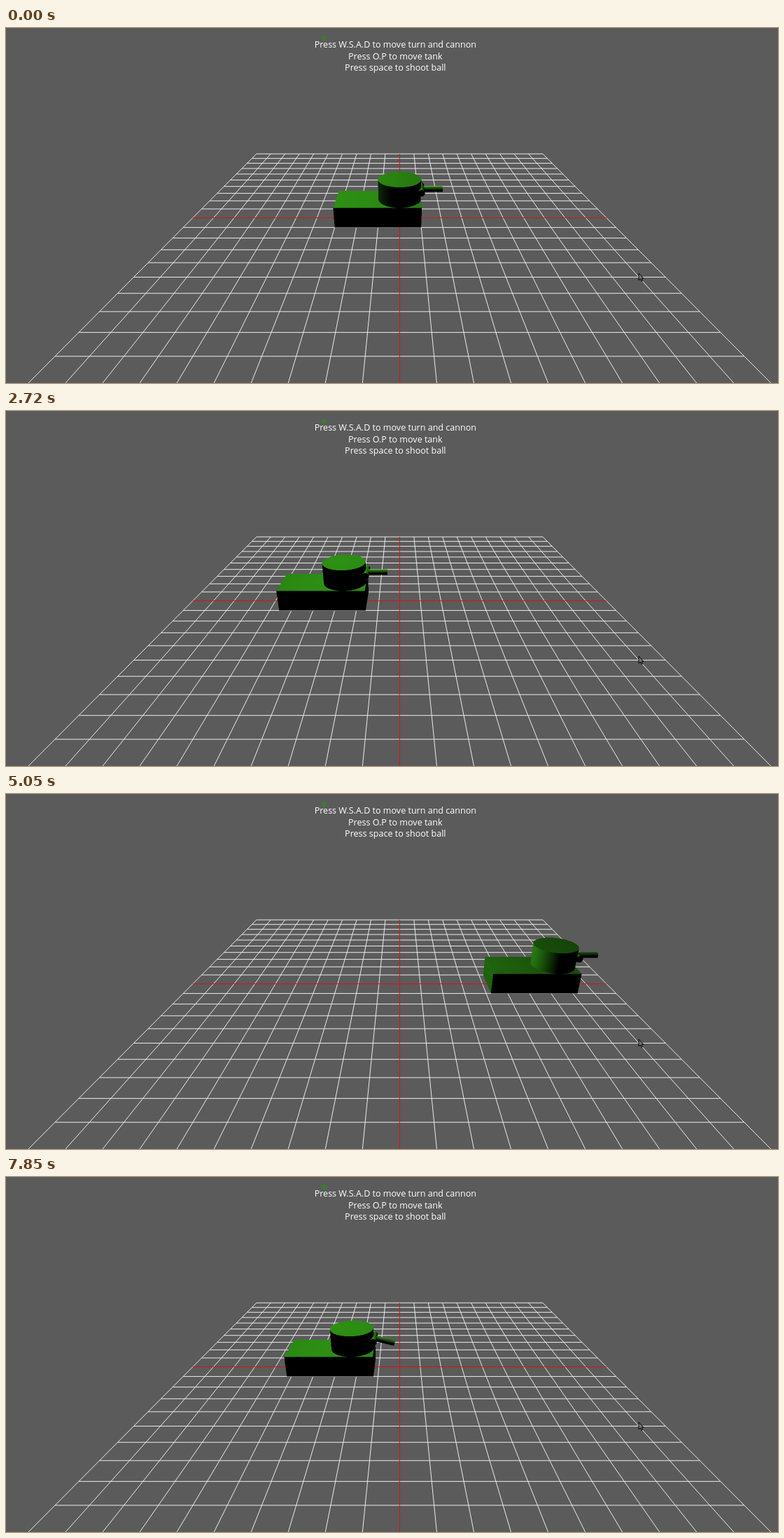
Animation of 1103 by 508 pixels, one loop 8 s. Source, as an HTML page with a canvas:

```html
<!DOCTYPE html>
<html lang="en">
<head>
<meta charset="utf-8">
<title>Tank</title>
<style>
  html, body { margin: 0; height: 100%; overflow: hidden; background: #5b5b5b; }
  canvas { display: block; }
</style>
</head>
<body>
<canvas id="stage" width="1103" height="508"></canvas>
<script>
const ctx = document.getElementById('stage').getContext('2d');
const LOOP = 8000, CX = 562.4, CY = 271.6, FOCAL = 594.6, Q = Math.sqrt(5);
const EYE = [0, 90, 180], LIGHT = [-30, 80, 0], GREEN = [45, 143, 20];

// Each run: first change, last change, number of changes, first value, last value
const DRIVE = [
  [550, 1240, 10, -3, -44], [1370, 1840, 7, -47.4, -70],
  [2030, 2800, 11, -67.9, -21], [2880, 3580, 10, -16.5, 26],
  [3700, 3731, 2, 31, 34.4], [3810, 4440, 9, 39, 76.6],
  [4510, 4670, 3, 81, 90.4], [4820, 5600, 11, 86, 40],
  [5660, 6440, 11, 34.9, -9], [6530, 6690, 3, -13, -22.1]
];
const AIM = [[6920, 7160, 4, 10, 41], [7530, 7850, 5, 30, -14.5]];

function valueAt(runs, t) {
  let value = 0;
  for (const [t0, t1, n, a, b] of runs) {
    if (t < t0) break;
    const k = Math.min(n - 1, Math.floor((t + 4 - t0) * (n - 1) / (t1 - t0)));
    value = a + (b - a) * k / (n - 1);
  }
  return value;
}

const dot = (a, b) => a[0] * b[0] + a[1] * b[1] + a[2] * b[2];
const along = (p, d, t) => [p[0] + d[0] * t, p[1] + d[1] * t, p[2] + d[2] * t];

// The camera looks from EYE to the world's centre
function project([x, y, z]) {
  const depth = 450 - y - 2 * z;
  return [CX + FOCAL * Q * x / depth, CY - FOCAL * (2 * y - z) / depth];
}

function line(a, b, color) {
  ctx.strokeStyle = color;
  ctx.beginPath();
  ctx.moveTo(...a);
  ctx.lineTo(...b);
  ctx.stroke();
}

function drawGrid() {
  for (const red of [false, true]) {
    for (let i = -100; i <= 100; i += 10) {
      if ((i === 0) !== red) continue;
      const color = red ? '#d81414' : '#ececec';
      line(project([-100, 0, i]), project([100, 0, i]), color);
      line(project([i, 0, -100]), project([i, 0, 100]), color);
    }
  }
}

// Wire diamond at the lamp's place
function drawLamp() {
  const at = (x, y, z) => project([LIGHT[0] + x, LIGHT[1] + y, LIGHT[2] + z]);
  const ring = [at(1, 0, 0), at(0, 0, 1), at(-1, 0, 0), at(0, 0, -1)];
  ctx.globalAlpha = 0.7;
  ring.forEach((p, i) => {
    line(p, ring[(i + 1) % 4], '#2d8f15');
    line(p, at(0, 1, 0), '#2d8f15');
    line(p, at(0, -1, 0), '#2d8f15');
  });
  ctx.globalAlpha = 1;
}

function drawText() {
  ctx.font = '12.55px "Open Sans", sans-serif';
  ctx.textAlign = 'center';
  ctx.fillStyle = '#fff';
  ['Press W.S.A.D to move turn and cannon', 'Press O.P to move tank', 'Press space to shoot ball']
    .forEach((text, i) => ctx.fillText(text, 556.3, 28 + 16.5 * i));
}

function drawPointer() {
  const arrow = new Path2D('M904 351v10l2.3-2 1.8 3.5 1.6-.8-1.7-3.4h2.8z');
  ctx.fillStyle = '#777';
  ctx.fill(arrow);
  ctx.strokeStyle = '#000';
  ctx.stroke(arrow);
}

// Both hit tests return [distance, normal] or nothing
function hitBox(o, d, lo, hi) {
  let near = -Infinity, far = Infinity, axis = 0;
  for (let i = 0; i < 3; i++) {
    const a = (lo[i] - o[i]) / d[i], b = (hi[i] - o[i]) / d[i];
    if (Math.min(a, b) > near) { near = Math.min(a, b); axis = i; }
    far = Math.min(far, Math.max(a, b));
  }
  if (near > far) return;
  const normal = [0, 0, 0];
  normal[axis] = -Math.sign(d[axis]);
  return [near, normal];
}

function hitCylinder(o, d, { base, axis, length, radius }) {
  const rel = along(o, base, -1);
  const da = dot(d, axis), oa = dot(rel, axis);
  const dp = along(d, axis, -da), op = along(rel, axis, -oa);
  const A = dot(dp, dp), B = dot(dp, op), C = dot(op, op) - radius * radius;
  const disc = B * B - A * C;
  if (disc < 0) return;
  const t = (-B - Math.sqrt(disc)) / A, h = oa + t * da;
  if (h >= 0 && h <= length) return [t, along([0, 0, 0], along(op, dp, t), 1 / radius)];
  const cap = ((da < 0 ? length : 0) - oa) / da, p = along(op, dp, cap);
  if (dot(p, p) <= radius * radius) return [cap, along([0, 0, 0], axis, -Math.sign(da))];
}

// The tank is ray traced at double size into a small layer
const W = 186, H = 88, TOP = 202, SCALE = 2;
const layer = document.createElement('canvas');
layer.width = W * SCALE;
layer.height = H * SCALE;
const layerCtx = layer.getContext('2d');

function drawTank(x, angle) {
  const left = Math.floor(CX + 3 * x - 110);
  const image = layerCtx.createImageData(layer.width, layer.height);
  const eye = [EYE[0] - x, EYE[1], EYE[2]], lamp = [LIGHT[0] - x, LIGHT[1], LIGHT[2]];
  const parts = [
    { base: [0, 10, 0], axis: [0, 1, 0], length: 10, radius: 10 },
    { base: [10, 15, -5], axis: [0, 0, 1], length: 10, radius: 1.6 },
    { base: [10, 15, 0], axis: [Math.cos(angle), Math.sin(angle), 0], length: 10, radius: 1.3 }
  ];
  for (let j = 0, k = 0; j < layer.height; j++) {
    for (let i = 0; i < layer.width; i++, k += 4) {
      const a = (left + (i + 0.5) / SCALE - CX) / FOCAL;
      const b = (CY - TOP - (j + 0.5) / SCALE) / FOCAL;
      const dir = [a, (2 * b - 1) / Q, (-2 - b) / Q];
      let best = hitBox(eye, dir, [-30, 0, -10], [10, 10, 10]);
      for (const part of parts) {
        const hit = hitCylinder(eye, dir, part);
        if (hit && (!best || hit[0] < best[0])) best = hit;
      }
      if (!best) continue;
      const toLamp = along(lamp, along(eye, dir, best[0]), -1);
      const shade = Math.max(0, dot(toLamp, best[1]) / Math.hypot(...toLamp));
      for (let c = 0; c < 3; c++) image.data[k + c] = GREEN[c] * shade;
      image.data[k + 3] = 255;
    }
  }
  layerCtx.putImageData(image, 0, 0);
  ctx.drawImage(layer, left, TOP, W, H);
}

let shown = '';
function frame() {
  const t = performance.now() % LOOP;
  const x = valueAt(DRIVE, t), angle = valueAt(AIM, t) * Math.PI / 180;
  const state = x + ',' + angle;
  if (state !== shown) {
    shown = state;
    ctx.fillStyle = '#5b5b5b';
    ctx.fillRect(0, 0, 1103, 508);
    drawGrid();
    drawLamp();
    drawTank(x, angle);
    drawText();
    drawPointer();
  }
  requestAnimationFrame(frame);
}
frame();
</script>
</body>
</html>
```
